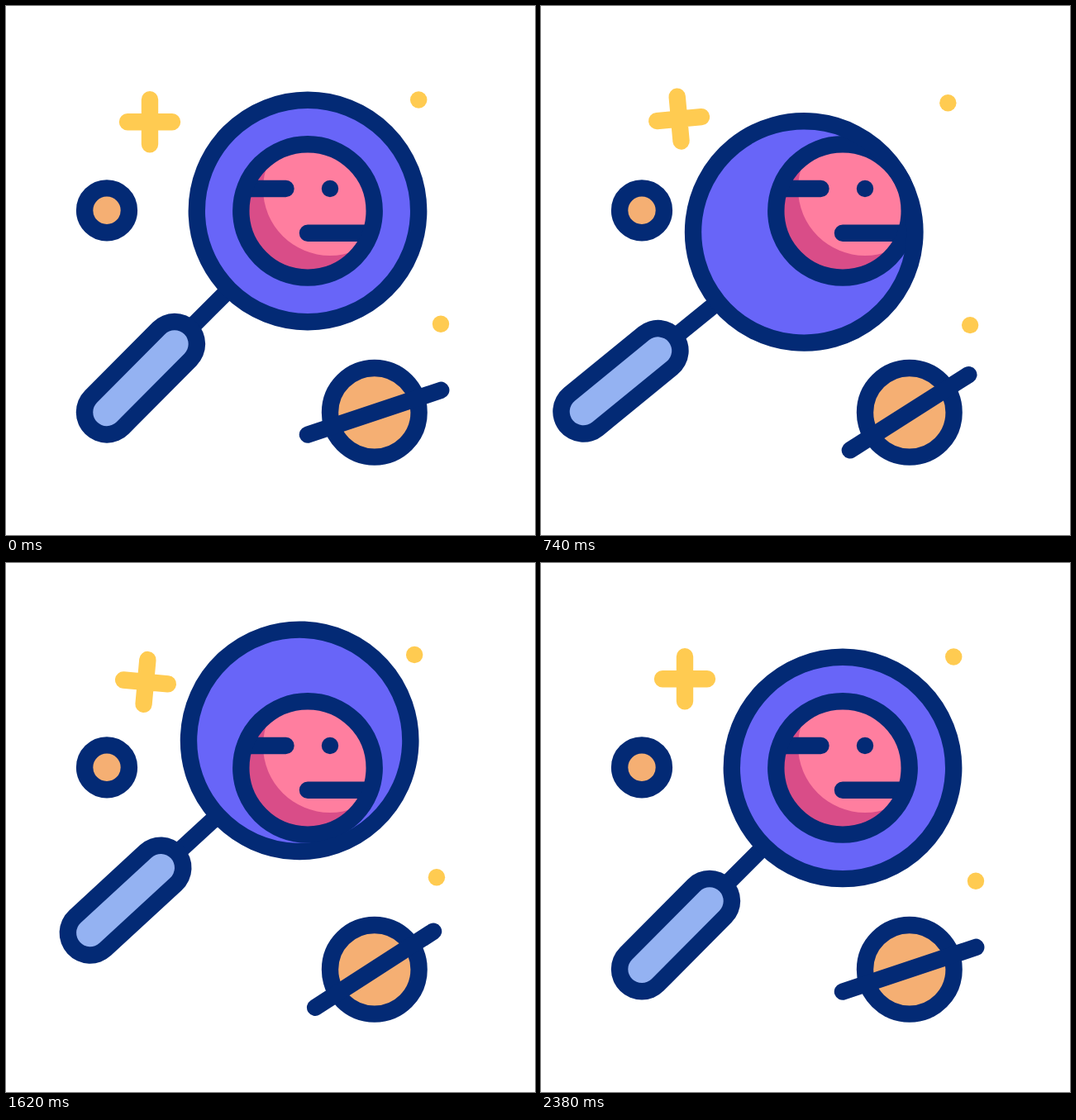
Write an HTML page that moves like this. It is 640 px wide and 640 px high and loops after 2400 ms.

```html
<!DOCTYPE html>
<html lang="en">
<head>
<meta charset="utf-8">
<style>
  html, body { margin: 0; width: 100%; height: 100%; overflow: hidden; background: #fff; }
  svg { display: block; width: 100vw; height: 100vh; }
  .line { stroke: #032a75; stroke-width: 20.4; stroke-linecap: round; fill: none; }
  .star { stroke: #ffcb51; stroke-width: 20.4; stroke-linecap: round; }
  .dot { fill: #ffcb51; }
  .orange { fill: #f5af73; }
</style>
</head>
<body>
<svg viewBox="0 0 640 640">
  <path id="star" class="star" d="M-27 0H27M0 -27V27"/>
  <circle id="topDot" class="dot" r="10.2"/>
  <circle id="sideDot" class="dot" r="10.2"/>
  <circle class="line orange" cx="122" cy="247.3" r="26.9"/>

  <g id="lens">
    <path class="line" d="M-95 95L-150 150"/>
    <path class="line" style="stroke-width:74.4" d="M-161 161L-243 243.5"/>
    <path class="line" style="stroke-width:33.4;stroke:#94b2f2" d="M-161 161L-243 243.5"/>
    <circle fill="#6865f8" r="134.2"/>
  </g>

  <clipPath id="disc"><circle cx="365" cy="247.9" r="80"/></clipPath>
  <g clip-path="url(#disc)">
    <circle cx="365" cy="247.9" r="80" fill="#d94d88"/>
    <circle cx="392" cy="221" r="81" fill="#ff7e9f"/>
    <path class="line" d="M285 221H338.5M365 274.8H445M392 221h.01"/>
  </g>
  <circle class="line" cx="365" cy="247.9" r="80.7"/>
  <circle id="rim" class="line" r="134.2"/>

  <circle class="line orange" cx="445.8" cy="491.8" r="53.8"/>
  <path id="ring" class="line" d="M-85 0H85"/>
</svg>
<script>
  const LOOP = 2400, CYCLE = 2380;

  // Corners of the lens's path: time, x, y, angle
  const lensPath = [
    [0, 365, 247.9, 0], [460, 341.2, 295.7, 5.8], [960, 308.8, 243.5, 5],
    [1160, 316.6, 217.6, 4], [1620, 355.1, 214.8, 2.5], [1840, 368.8, 224, 1.5]
  ];

  // Smooth closed curve through unevenly timed points
  function follow(path, t) {
    const n = path.length;
    const point = i => {
      const [time, ...pos] = path[(i + n) % n];
      return { time: time + Math.floor(i / n) * CYCLE, pos };
    };
    const i = path.findLastIndex(p => p[0] <= t);
    const [a, b, c, d] = [-1, 0, 1, 2].map(k => point(i + k));
    const span = c.time - b.time, u = (t - b.time) / span;
    const slope = (p, q, r, k) => {
      const before = q.time - p.time, after = r.time - q.time;
      return ((q.pos[k] - p.pos[k]) / before * after + (r.pos[k] - q.pos[k]) / after * before)
        / (before + after) * span;
    };
    return b.pos.map((from, k) => {
      const m = slope(a, b, c, k), w = slope(b, c, d, k), diff = c.pos[k] - from;
      return from + u * (m + u * (3 * diff - 2 * m - w + u * (m + w - 2 * diff)));
    });
  }

  function place(id, x, y, angle = 0) {
    document.getElementById(id).setAttribute('transform', `translate(${x} ${y}) rotate(${angle})`);
  }

  // Drift around a small tilted ellipse that passes through (x, y)
  function float(id, x, y, phase, height, lean, angle) {
    const sin = Math.sin(phase), away = 1 - Math.cos(phase);
    place(id, x - 4.25 * away - 1.1 * sin, y + height * sin + lean * away, angle);
  }

  function draw(now) {
    const t = Math.min(now % LOOP, CYCLE), phase = 2 * Math.PI * t / CYCLE;
    const lens = follow(lensPath, t);
    place('lens', ...lens);
    place('rim', ...lens);

    float('star', 174, 140.3, phase, -4, 0, -5 * Math.sin(phase) + .8 * Math.sin(2 * phase));
    float('topDot', 499.2, 113.5, phase, 3.4, .4);
    float('sideDot', 526, 384.8, phase, 3.2, -1.2);

    const swing = 1 - Math.abs(2 * t / CYCLE - 1);
    place('ring', 445.6, 491.7, -18.43 - 22.5 * swing);
    requestAnimationFrame(draw);
  }
  draw(performance.now());
</script>
</body>
</html>
```
